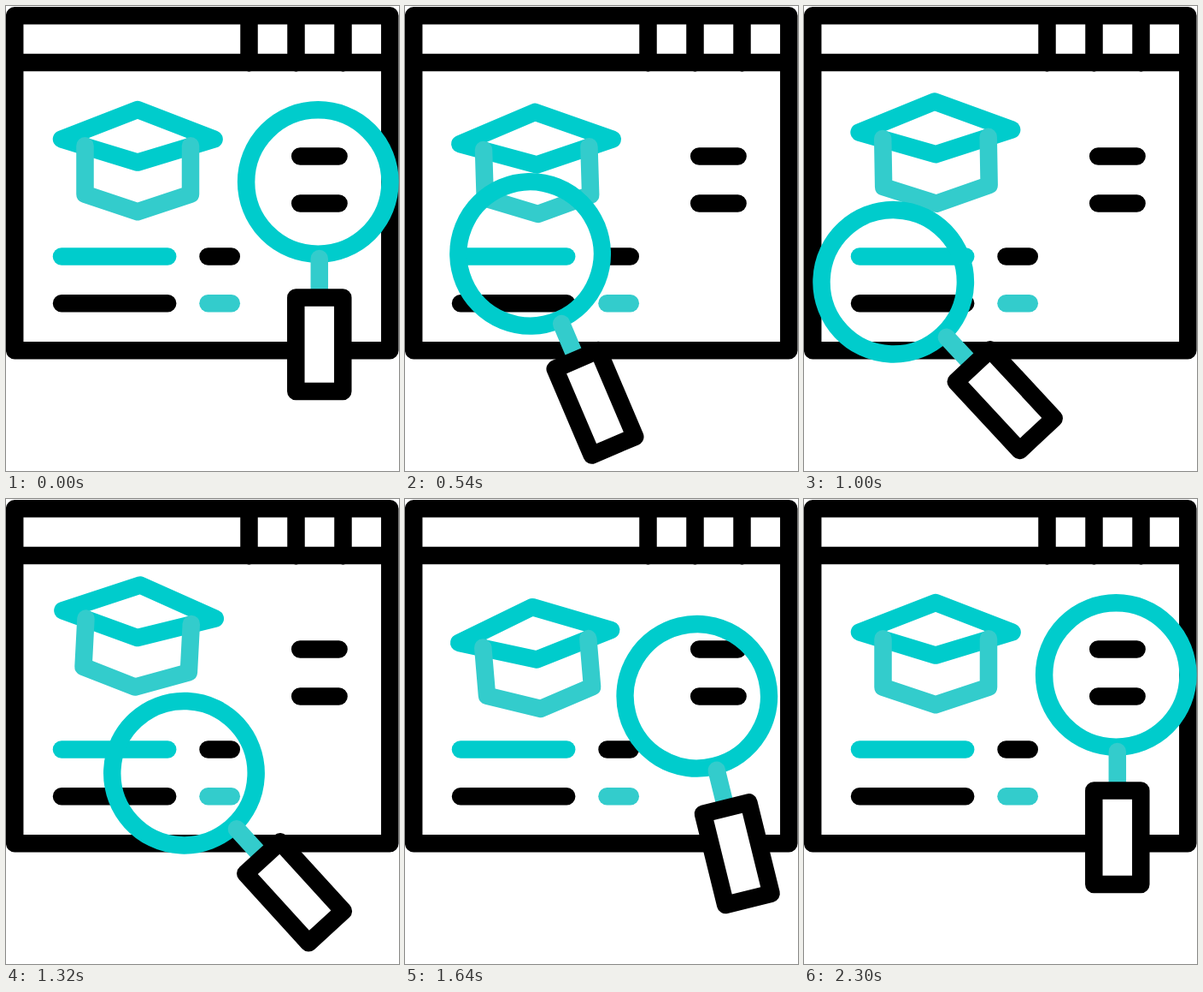
Write an HTML page that moves like this. It is 460 by 543 pixels and loops after 2.4 s.

```html
<!DOCTYPE html>
<html lang="en">
<head>
<meta charset="utf-8">
<title>Course search</title>
<style>
  html, body { margin: 0; width: 100%; height: 100%; overflow: hidden; background: #fff; }
  svg { display: block; width: 100%; height: 100%; fill: none; stroke-width: 20.5; stroke-linecap: round; stroke-linejoin: round; }
  .ink { stroke: #000; }
  .cyan { stroke: #0cc; }
  .teal { stroke: #3cc; }
  .fill { stroke-width: 23; }
</style>
</head>
<body>
<svg viewBox="0 0 460 543">
  <g class="ink">
    <path d="M10.2 11.2H449.3V402.2H10.2ZM10.2 66H449.3M284.5 11.2V66.4M339.5 11.2V66.4M394.5 11.2V66.4"/>
    <path d="M344.2 175.6H389.6M344.2 230.6H389.6M236.5 292.4H263.8M65 347.3H189.2"/>
  </g>
  <path class="cyan" d="M65 292.4H189.2"/>
  <path class="teal" d="M236.5 347.3H263.8"/>
  <path id="topFill" class="cyan fill"/>
  <path id="lowFill" class="teal fill"/>
  <g id="cap">
    <path class="cyan" d="M65 155.5L154 121L243.6 155.5L154 182.6Z"/>
    <path class="teal" d="M92.5 163.3V219.7L154 240.2L216 219.7V163.3"/>
  </g>
  <!-- drawn around the centre of the glass -->
  <g id="lens">
    <circle class="cyan" r="84.2"/>
    <path class="teal" d="M1.5 89.5V135"/>
    <path class="ink" fill="#fff" d="M-26 135H29V244.6H-26Z"/>
  </g>
</svg>
<script>
  const LOOP = 2400, STEP = 20;
  const el = id => document.getElementById(id);

  // Eased 0 to 1 between two times; bend > 1 delays the start.
  function ramp(t, from, to, bend = 1) {
    const p = Math.min(1, Math.max(0, (t - from) / (to - from)));
    return (1 - Math.cos(Math.PI * p ** bend)) / 2;
  }

  function place(id, x, y, turn, pivot = '') {
    el(id).setAttribute('transform', `translate(${x} ${y}) rotate(${turn} ${pivot})`);
  }

  // The glass sweeps left and down, then returns and swings past upright.
  function drawLens(t) {
    const left = ramp(t, 210, 675) - ramp(t, 840, 1801, 1.15);
    const down = ramp(t, 215, 720) - ramp(t, 1275, 1800);
    const tilt = ramp(t, 320, 740) - ramp(t, 1275, 1900);
    const swing = ramp(t, 1275, 1900) - ramp(t, 1900, 2300);
    place('lens', 365.3 - 271.3 * left, 205.5 + 116.8 * down, 3.2 * swing - 43 * tilt);
  }

  // The cap dips, jumps, lands low and settles, rocking as it goes.
  function drawCap(t) {
    const dip = ramp(t, 210, 820) - ramp(t, 820, 1200) + ramp(t, 1200, 1620) - ramp(t, 1620, 1940);
    const jump = ramp(t, 820, 1200) - ramp(t, 1200, 1620);
    const rockLeft = ramp(t, 210, 800) - ramp(t, 800, 1310);
    const rockRight = ramp(t, 800, 1310) - ramp(t, 1310, 1700);
    const landing = ramp(t, 1310, 1700) - ramp(t, 1700, 1955);
    place('cap', 0, 5 * dip - 26.5 * jump, 3 * (rockRight - rockLeft) - 5.3 * landing, '154 180.5');
  }

  // A coloured bar grows from the left and draws back.
  function drawBar(id, y, t) {
    const amount = ramp(t, 1820, 1980) - ramp(t, 2060, 2215);
    el(id).setAttribute('d', amount > 0 ? `M344.4 ${y}h${45.2 * amount}` : '');
  }

  function render(t) {
    drawLens(t);
    drawCap(t);
    drawBar('lowFill', 230.6, t);
    drawBar('topFill', 175.6, t - 85);
  }

  const start = performance.now();
  function tick() {
    const t = (performance.now() - start) % LOOP;
    render(Math.floor(t / STEP) * STEP);
    requestAnimationFrame(tick);
  }
  render(0);
  requestAnimationFrame(tick);
</script>
</body>
</html>
```
